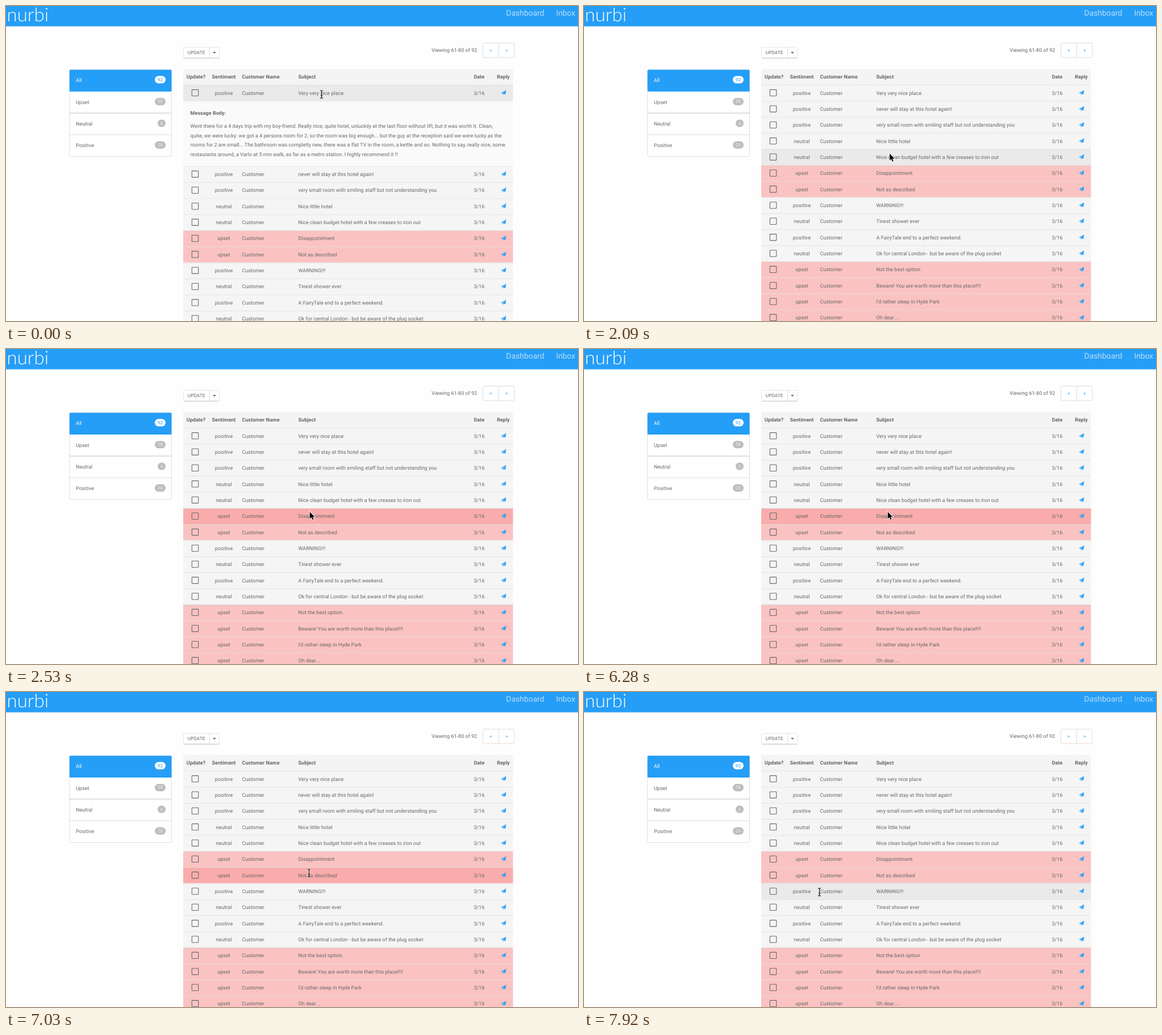
Recreate the animation shown at these times as an HTML page. Size 1007 px wide and 556 px high, loop 8000 ms.

```html
<!DOCTYPE html>
<html lang="en">
<head>
<meta charset="utf-8">
<title>Inbox</title>
<style>
html, body { margin: 0; width: 100%; height: 100%; overflow: hidden; background: #fefefe; }
svg { display: block; width: 1007px; height: 556px; }
text { font-family: Roboto, sans-serif; font-size: 8.99px; letter-spacing: .036px; fill: #666; text-rendering: geometricPrecision; }
.bold { font-weight: 700; }
.mid { text-anchor: middle; }
.small { font-size: 8.29px; }
.blue { fill: #259ef7; }
.white { fill: #fff; }
.pale { fill: #ececec; }
.nav { font-size: 13.85px; letter-spacing: 0; fill: #b9defc; }
.brand { font: 300 33px Lato, sans-serif; letter-spacing: 0; fill: #fff; }
</style>
</head>
<body>
<svg viewBox="0 0 1007 556">
  <g id="page"></g>
  <g id="table"></g>
  <g id="pointer"></g>
</svg>
<script>
const BLUE = '#259ef7', LINE = '#ddd';
const LOOP = 8000;
const LEFT = 312, WIDTH = 580.6, FIRST = 139.3, PITCH = 28.34, LEADING = 16.55;

const ROWS = [
  ['positive', 'Very very nice place'],
  ['positive', 'never will stay at this hotel again!'],
  ['positive', 'very small room with smiling staff but not understanding you'],
  ['neutral', 'Nice little hotel'],
  ['neutral', 'Nice clean budget hotel with a few creases to iron out'],
  ['upset', 'Disappointment'],
  ['upset', 'Not as described'],
  ['positive', 'WARNING!!!'],
  ['neutral', 'Tinest shower ever'],
  ['positive', 'A FairyTale end to a perfect weekend.'],
  ['neutral', 'Ok for central London - but be aware of the plug socket'],
  ['upset', 'Not the best option.'],
  ['upset', 'Beware! You are worth more than this place!!!!'],
  ['upset', "I'd rather sleep in Hyde Park"],
  ['upset', 'Oh dear....']
];

const MESSAGES = {
  0: [
    'Went there for a 4 days trip with my boy-friend. Really nice, quite hotel, unluckily at the last floor without lift, but it was worth it. Clean,',
    'quite, we were lucky: we got a 4 persons room for 2, so the room was big enough... but the guy at the reception said we were lucky as the',
    'rooms for 2 are small... The bathroom was completly new, there was a flat TV in the room, a kettle and so. Nothing to say, really nice, some',
    'restaurants around, a Varlo at 5 min walk, as far as a metro station. I highly recommend it !!'
  ],
  5: [
    'Friendly staff. What you see on the website is not what you buy. The room they gave us when we arrived was a tiny and hot one in the',
    'basement, then we compalined and they gave us the nightmare room 6 which is close to the brekfast room. We could hear everything from',
    'outside and so impossible to sleep well. Then thy moved us to room 20 which was better. Bed had wheels and moved far too easily.',
    'Bathrooms are tiny. Nowhere to hang towels. Breakfast area was very very tiny. A joke... we could not move!!! Breakfast was far too simple',
    'and even the coffee was cold. We (couple) paid 110 pounds for 2 days. After all that was mentioned above, this price was far too',
    'expensive. Ah! They charge you if you pay by credit card and this is not mentioned on the website.'
  ]
};

// start time, hovered row, opened row (-1: none), pointer kind and place
const STEPS = [
  [0, 0, 0, 'beam', 555.5, 155.8],
  [1350, 0, -1, 'beam', 555.5, 155.8],
  [1640, 0, -1, 'none', 0, 0],
  [1790, 1, -1, 'arrow', 548, 192.5],
  [1940, 3, -1, 'arrow', 542, 233.5],
  [2090, 4, -1, 'arrow', 538, 260.5],
  [2230, 5, -1, 'arrow', 535.8, 284.5],
  [2380, 5, -1, 'arrow', 535.8, 286.5],
  [2530, 5, -1, 'arrow', 534.8, 287.5],
  [3880, 5, 5, 'arrow', 534.8, 287.5],
  [6280, 5, -1, 'arrow', 534.8, 287.5],
  [7030, 6, -1, 'beam', 533.5, 319.3],
  [7180, 6, -1, 'beam', 536, 354],
  [7330, 7, -1, 'beam', 529, 354],
  [7770, 7, -1, 'arrow', 509.5, 353.5],
  [7920, 7, -1, 'beam', 414.5, 353]
];

const text = (x, y, s, cls = '') => `<text x="${x}" y="${y}" class="${cls}">${s}</text>`;
const rect = (x, y, w, h, fill, more = '') =>
  `<rect x="${x}" y="${y}" width="${w}" height="${h}" fill="${fill}" ${more}/>`;
const path = (d, fill, more = '') => `<path d="${d}" fill="${fill}" ${more}/>`;
const at = (x, y, inner) => `<g transform="translate(${x} ${y})">${inner}</g>`;

function badge(right, y, w, label, fill, cls) {
  return rect(right - w, y, w, 13, fill, 'rx="6.5"') + text(right - w / 2, y + 9.1, label, 'mid small ' + cls);
}

function drawPage() {
  const border = `stroke="${LINE}" stroke-width="1"`;
  let out = rect(0, 35, 1007, 1.6, '#c4e0f6') + rect(0, 0, 1007, 35.6, BLUE);
  out += text(1.5, 27, 'nurbi', 'brand');
  out += text(880.6, 17.4, 'Dashboard', 'nav') + text(968.4, 17.4, 'Inbox', 'nav');

  // update button
  out += rect(312.5, 73, 63, 19, '#fff', 'rx="1.5" stroke="#e4e4e4"');
  out += rect(313, 91.5, 62.5, 1, '#c8c8c8') + rect(358, 73, 1, 19, LINE);
  out += text(319.8, 85.2, 'UPDATE', 'small') + path('M364 81h5.8l-2.9 3z', '#666');

  // pager
  out += text(749.3, 80.6, 'Viewing 61-80 of 92');
  out += rect(839.5, 65.5, 55.5, 25.5, '#fff', 'rx="2" ' + border) + rect(867, 65.5, 1, 25.5, LINE);
  out += text(853.5, 81.3, '«', 'mid blue') + text(881.3, 81.3, '»', 'mid blue');

  // filter list
  out += rect(111.8, 112.8, 179.7, 152.7, '#fff', 'rx="2" ' + border);
  out += rect(111.8, 112.6, 179.7, 38.4, BLUE, 'rx="1.5"');
  out += rect(112, 188.2, 179.5, 1.6, '#d8d8d8') + rect(112, 226.7, 179.5, 1, LINE);
  out += text(123, 134.4, 'All', 'white') + badge(281, 123.6, 19, '92', '#fff', 'blue');
  [['Upset', 58, 172.8, 162.2], ['Neutral', 6, 211.4, 200.6], ['Positive', 28, 248.8, 238.8]]
    .forEach(([name, n, y, by]) => {
      out += text(123, y, name) + badge(281, by, n > 9 ? 19 : 14, n, '#bdbdbd', 'pale');
    });
  return out;
}

const PLANE = path('M9 0L7.7 7.9L5 6.8L3.5 8.8L3.2 6.3L7.7 1.6L2.3 6L0 5z', BLUE);

function drawRow(i, y, hovered) {
  const [mood, subject] = ROWS[i];
  const fill = mood === 'upset' ? (hovered ? '#f9acab' : '#fac3c2') : (hovered ? '#eaeaea' : '#f5f5f5');
  const base = y + 17.2;
  return rect(LEFT, y, WIDTH, PITCH, fill) + rect(LEFT, y, WIDTH, 0.7, LINE) +
    rect(327.3, y + 8.3, 11.4, 11.2, 'none', 'rx=".7" stroke="#6a6a6a" stroke-width="1.1"') +
    text(383.5, base, mood, 'mid') + text(415.6, base, 'Customer') +
    text(514.5, base, subject) + text(833, base, '3/16', 'mid') + at(871.5, y + 9.1, PLANE);
}

function drawMessage(lines, y, height) {
  return rect(LEFT, y, WIDTH, height, '#fafafa') + rect(LEFT, y, WIDTH, 0.7, LINE) +
    text(324.6, y + 24.7, 'Message Body:', 'bold') +
    lines.map((s, i) => text(324.6, y + 47.5 + i * LEADING, s)).join('');
}

function drawTable(hover, open) {
  let out = rect(LEFT, 111.3, WIDTH, FIRST - 111.3, '#f4f4f4');
  [[334.5, 'Update?'], [383.5, 'Sentiment'], [833, 'Date'], [875.5, 'Reply']]
    .forEach(([x, s]) => { out += text(x, 128.4, s, 'bold mid'); });
  out += text(415.6, 128.4, 'Customer Name', 'bold') + text(514.5, 128.4, 'Subject', 'bold');
  let y = FIRST;
  for (let i = 0; i < ROWS.length && y < 556; i++) {
    out += drawRow(i, y, i === hover);
    y += PITCH;
    if (i === open) {
      const height = 49 + MESSAGES[i].length * LEADING;
      out += drawMessage(MESSAGES[i], y, height);
      y += height;
    }
  }
  return out;
}

const BEAM = 'M-2.6 -6.8Q0 -6.8 0 -5V5.2Q0 7 -2.6 7M2.6 -6.8Q0 -6.8 0 -5M0 5.2Q0 7 2.6 7M-1.6 2.6H1.6';
const ARROW = 'M0 0V12.2L2.8 9.6L4.8 14L6.7 13.1L4.9 8.9H8.7z';
const POINTERS = {
  none: '',
  beam: path(BEAM, 'none', 'stroke="#fff" stroke-width="2.4" stroke-opacity=".8"') +
    path(BEAM, 'none', 'stroke="#111" stroke-width="1.2"'),
  arrow: path(ARROW, '#000', 'stroke="#fff" stroke-width="1.6" paint-order="stroke"')
};

const [page, table, pointer] = ['page', 'table', 'pointer'].map(id => document.getElementById(id));
page.innerHTML = drawPage();
let shown = null;

function frame() {
  const t = performance.now() % LOOP;
  const step = STEPS.findLast(s => s[0] <= t);
  if (step !== shown) {
    const [, hover, open, kind, x, y] = step;
    table.innerHTML = drawTable(hover, open);
    pointer.innerHTML = at(x, y, POINTERS[kind]);
    shown = step;
  }
  requestAnimationFrame(frame);
}
frame();
</script>
</body>
</html>
```
